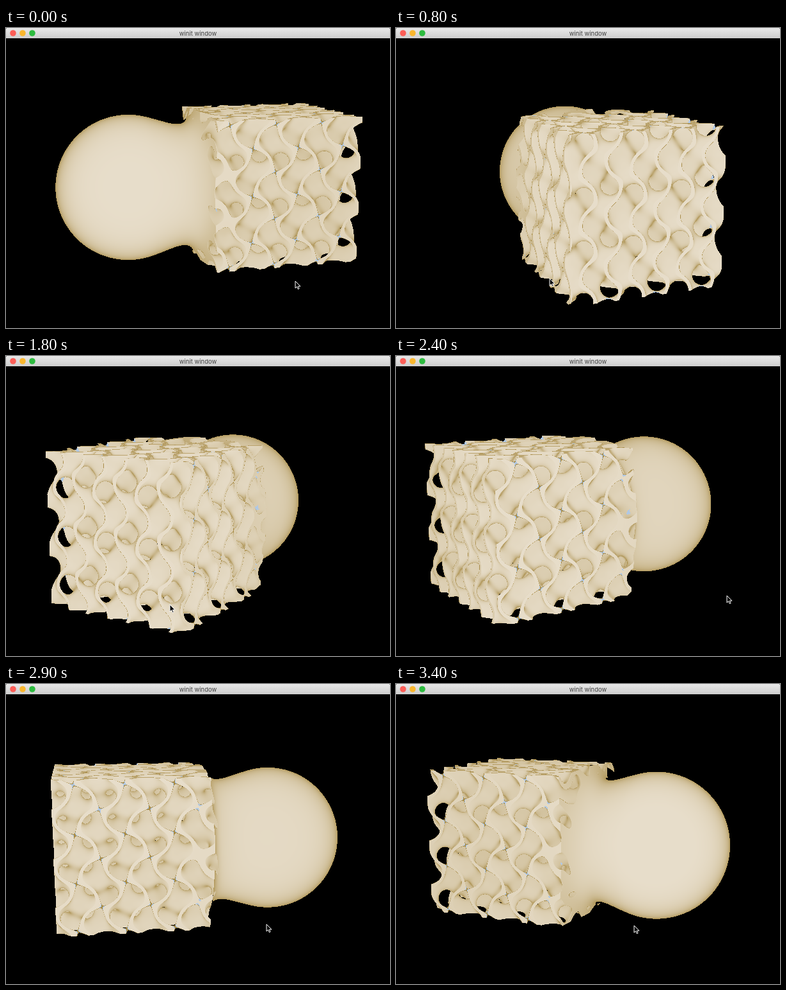
Write an HTML page with a canvas that moves like this. It is 600 px wide and 467 px high and loops after 3500 ms.

```html
<!DOCTYPE html>
<html lang="en">
<head>
<meta charset="utf-8">
<title>winit window</title>
<style>
  html, body { margin: 0; width: 100%; height: 100%; overflow: hidden; background: #000; }
  canvas, svg { position: absolute; left: 0; top: 0; width: 600px; height: 467px; display: block; }
</style>
</head>
<body>
<canvas id="view" width="600" height="467"></canvas>
<svg viewBox="0 0 600 467">
  <defs>
    <linearGradient id="bar" x2="0" y2="1">
      <stop offset="0" stop-color="#e9e9e9"/>
      <stop offset="1" stop-color="#cdcdcd"/>
    </linearGradient>
  </defs>
  <path d="M0 16V1L1 0H599L600 1V16Z" fill="url(#bar)"/>
  <circle cx="11" cy="8" r="4.8" fill="#fb5e57"/>
  <circle cx="26" cy="8" r="4.8" fill="#f8b62e"/>
  <circle cx="41" cy="8" r="4.8" fill="#2dbb3f"/>
  <text x="300" y="11.7" text-anchor="middle" font-family="Inter, 'Liberation Sans', sans-serif" font-size="9.5" fill="#404040">winit window</text>
  <path id="cursor" d="M0 0V11L2.6 8.7L4.3 12.6L6.1 11.8L4.4 8.1H8Z" fill="#0a0a0a" stroke="#fff" stroke-width="1"/>
</svg>
<script>
const LOOP = 3500, STEP = 100;
const WIDTH = 600, HEIGHT = 467, CENTER_X = 300.8, CENTER_Y = 242.3;
const FOCAL = 1176, DISTANCE = 10.7, SIN_TILT = 0.2, COS_TILT = Math.sqrt(1 - SIN_TILT ** 2);
const SCALE = 10, WALL = 0.03, BLEND = 0.75;
const DARK = [168, 140, 72], LIGHT = [232, 222, 203], BLUE = [176, 200, 228];

// [time, angle of the cube's axis in degrees]
const TURN = [[0, -14.5], [700, 63], [800, 68.7], [900, 70.6], [1400, 70.6], [1800, 121.5],
  [2100, 145.2], [2500, 145.2], [2900, 170.8], [3300, 202.5]];
// [time, x, y] of the pointer tip
const POINTER = [[0, 452, 394], [800, 240, 390], [900, 236, 390], [1400, 374, 387], [1800, 256, 387],
  [2100, 204, 382], [2400, 517, 373], [2500, 500, 373], [2900, 407, 374], [3300, 335, 377], [3400, 372, 376]];

const context = document.getElementById("view").getContext("2d");
const cursor = document.getElementById("cursor");
const cache = new Map();

const clamp = value => Math.min(1, Math.max(0, value));

function sample(keys, time) {
  const next = keys.findIndex(key => key[0] > time);
  if (next < 0) return keys[keys.length - 1].slice(1);
  const [a, b] = [keys[next - 1], keys[next]];
  const u = (time - a[0]) / (b[0] - a[0]);
  return a.slice(1).map((value, i) => value + (b[i + 1] - value) * u);
}

// Fast periodic sine lookup
const SIZE = 16384, MASK = SIZE - 1, QUARTER = SIZE / 4;
const TO_INDEX = SCALE * SIZE / (2 * Math.PI);
const SINE = Float32Array.from({ length: SIZE }, (_, i) => Math.sin(i * 2 * Math.PI / SIZE));

function gyroid(x, y, z) {
  const i = Math.round(x * TO_INDEX), j = Math.round(y * TO_INDEX), k = Math.round(z * TO_INDEX);
  const value = SINE[j & MASK] * SINE[(k + QUARTER) & MASK]
    + SINE[k & MASK] * SINE[(i + QUARTER) & MASK]
    - SINE[i & MASK] * SINE[(j + QUARTER) & MASK];
  return Math.abs(value) / SCALE - WALL;
}

function box(x, y, z) {
  return Math.max(Math.abs(x - 1), Math.abs(y), Math.abs(z)) - 1;
}

function scene(x, y, z) {
  const ball = Math.sqrt((x + 1) * (x + 1) + y * y + z * z) - 1;
  const block = box(x, y, z);
  if (block > ball + BLEND) return ball;
  const lattice = Math.max(block, gyroid(x, y, z));
  const mix = Math.max(BLEND - Math.abs(ball - lattice), 0);
  return Math.min(ball, lattice) - mix * mix / (4 * BLEND);
}

function normal(field, x, y, z) {
  const e = 0.006;
  const nx = field(x + e, y, z) - field(x - e, y, z);
  const ny = field(x, y + e, z) - field(x, y - e, z);
  const nz = field(x, y, z + e) - field(x, y, z - e);
  const length = Math.sqrt(nx * nx + ny * ny + nz * nz) || 1;
  return [nx / length, ny / length, nz / length];
}

function shade(x, y, z, dx, dy, dz, distance) {
  const [nx, ny, nz] = normal(scene, x, y, z);
  const facing = clamp(-(nx * dx + ny * dy + nz * dz));
  const block = box(x, y, z);
  const open = clamp((Math.hypot(x + 1, y, z) - 1) / 0.5);

  // Where a wall lies flat against a cut face it takes a cool tint
  if (open > 0.5 && facing > 0.5 && Math.abs(block) < 0.006 && gyroid(x, y, z) > -0.004) {
    const [gx, gy, gz] = normal(gyroid, x, y, z);
    const [bx, by, bz] = normal(box, x, y, z);
    if (Math.abs(gx * bx + gy * by + gz * bz) > 0.92) return BLUE;
  }

  let light = 1 - Math.pow(1 - facing, 2.7);
  for (const reach of [0.06, 0.13]) {
    const clear = scene(x + nx * reach, y + ny * reach, z + nz * reach) / reach;
    light *= 1 - 0.25 * open * clamp(1 - clear);
  }
  light *= 1 - 0.14 * open * clamp(-block / 0.4);
  light *= 1 - 0.12 * Math.max(0, distance - 9.5);
  return DARK.map((c, i) => c + (LIGHT[i] - c) * light);
}

function render(degrees) {
  const image = new ImageData(WIDTH, HEIGHT);
  const pixels = new Uint32Array(image.data.buffer).fill(0xff000000);
  const angle = degrees * Math.PI / 180, c = Math.cos(angle), s = Math.sin(angle);
  const ox = DISTANCE * COS_TILT * s, oy = -DISTANCE * COS_TILT * c, oz = DISTANCE * SIN_TILT;

  for (let row = 100; row < 445; row++) {
    const up = CENTER_Y - row - 0.5;
    const depth = -up * SIN_TILT - FOCAL * COS_TILT;
    const rise = up * COS_TILT - FOCAL * SIN_TILT;
    for (let column = 35; column < 565; column++) {
      const side = column + 0.5 - CENTER_X;
      const norm = 1 / Math.sqrt(side * side + up * up + FOCAL * FOCAL);
      const dx = (side * c + depth * s) * norm;
      const dy = (side * s - depth * c) * norm;
      const dz = rise * norm;

      // Clip the ray to the bounds of the whole solid
      const ax = (-2.02 - ox) / dx, bx = (2.02 - ox) / dx;
      const ay = (-1.06 - oy) / dy, by = (1.06 - oy) / dy;
      const az = (-1.06 - oz) / dz, bz = (1.06 - oz) / dz;
      let t = Math.max(Math.min(ax, bx), Math.min(ay, by), Math.min(az, bz));
      const end = Math.min(Math.max(ax, bx), Math.max(ay, by), Math.max(az, bz));

      for (let i = 0; i < 140 && t < end; i++) {
        const x = ox + dx * t, y = oy + dy * t, z = oz + dz * t;
        const d = scene(x, y, z);
        if (d < 0.001) {
          const [r, g, b] = shade(x, y, z, dx, dy, dz, t);
          pixels[row * WIDTH + column] = (255 << 24 | b << 16 | g << 8 | r) >>> 0;
          break;
        }
        t += d * 0.65;
      }
    }
  }
  return image;
}

let shown = -1;
function draw(now) {
  const time = Math.floor(now % LOOP / STEP) * STEP;
  if (time !== shown) {
    const [angle] = sample(TURN, time);
    if (!cache.has(angle)) cache.set(angle, render(angle));
    context.putImageData(cache.get(angle), 0, 0);
    const [x, y] = sample(POINTER, time);
    cursor.setAttribute("transform", `translate(${x} ${y})`);
    shown = time;
  }
}

const start = performance.now();
function tick() {
  draw(performance.now() - start);
  requestAnimationFrame(tick);
}
tick();
</script>
</body>
</html>
```
